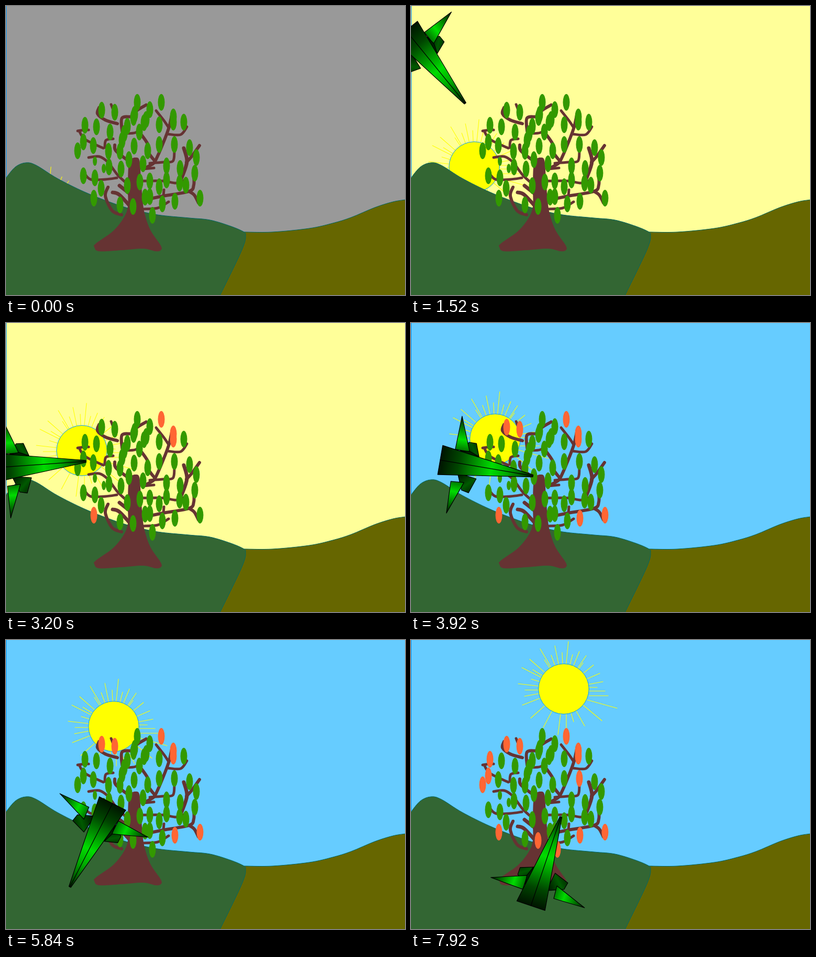
Animation, 763 px wide and 555 px high, one loop 8000 ms. Source, as an HTML page with a canvas:

```html
<!DOCTYPE html>
<html lang="en">
<head>
<meta charset="utf-8">
<title>Tree at sunrise</title>
<style>
  html, body { margin: 0; width: 100%; height: 100%; overflow: hidden; }
  canvas { display: block; width: 763px; height: 555px; }
</style>
</head>
<body>
<canvas id="stage" width="763" height="555"></canvas>
<script>
const c = document.getElementById('stage').getContext('2d');
const LOOP = 8000, STEP = 80;
const BARK = '#663333', TEAL = '#006666', BLUE = '#0099ff';

// Turns "x,y x,y" into a list of number lists.
const parse = s => s.trim().split(/\s+/).map(p => p.split(',').map(Number));

// Catmull-Rom curve through the points.
function spline(p) {
  const path = new Path2D(), n = p.length - 1;
  path.moveTo(...p[0]);
  for (let i = 0; i < n; i++) {
    const a = p[Math.max(i - 1, 0)], b = p[i], d = p[i + 1], e = p[Math.min(i + 2, n)];
    path.bezierCurveTo(
      b[0] + (d[0] - a[0]) / 6, b[1] + (d[1] - a[1]) / 6,
      d[0] - (e[0] - b[0]) / 6, d[1] - (e[1] - b[1]) / 6, d[0], d[1]);
  }
  return path;
}

const curve = s => spline(parse(s));

function polygon(s) {
  const path = new Path2D();
  parse(s).forEach(p => path.lineTo(...p));
  path.closePath();
  return path;
}

// Linear interpolation of rows [time, ...values].
function tween(keys, t) {
  let i = 0;
  while (i < keys.length - 2 && t >= keys[i + 1][0]) i++;
  const a = keys[i], b = keys[i + 1], k = (t - a[0]) / (b[0] - a[0]);
  return a.slice(1).map((v, j) => v + (b[j + 1] - v) * k);
}

const sunKeys = parse(`0,77,400 1520,121,309 3200,145,245 4800,180,196
  5840,206,166 6960,248,129 7920,292,94`);
const planeKeys = parse(`0,-75,-30,55 1520,47,117,51 1760,50,146,46 3200,63,272,-4
  4560,217,284,22 4800,206,302,81 5840,163,394,117 6160,152,417,100
  6560,138,452,45 6960,176,460,-19 7920,258,425,-71.4`);

function skyColor(t) {
  return t < 480 ? '#999999' : t < 1280 ? '#cccc99' : t < 3360 ? '#ffff99' : '#66ccff';
}

const rays = parse(`9,-91 -17,-83 -45,-77 -65,-57 -80,-41 -87,-10 -75,14 -79,31
  -63,56 -39,74 -11,88 19,63 40,71 73,61 30,-72 43,-64 57,-46 69,-30 75,-14
  -3,-70 17,-66 -24,-65 -37,-56 -59,-37 -62,-19 37,-50`);
const flatRays = parse('48,-3,64,-3 48,4,79,4 48,13,85,13 45,21,102,37 -48,2,-74,2 5,48,5,76');

function drawSun(t) {
  c.save();
  c.translate(...tween(sunKeys, t));
  c.beginPath();
  for (const [x, y] of rays) {
    const k = 48 / Math.hypot(x, y);
    c.moveTo(x * k, y * k);
    c.lineTo(x, y);
  }
  for (const [a, b, x, y] of flatRays) {
    c.moveTo(a, b);
    c.lineTo(x, y);
  }
  c.lineWidth = 1.1;
  c.strokeStyle = c.fillStyle = '#ffff00';
  c.stroke();
  c.beginPath();
  c.arc(0, 0, 48.3, 0, 7);
  c.fill();
  c.strokeStyle = BLUE;
  c.lineWidth = 1;
  c.stroke();
  c.restore();
}

const hillEdge = curve(`0,330 18,309 38,301 58,306 98,331 150,357 200,377 240,390
  290,401 350,407 390,411 430,423 455,434 458,441 456,455 444,484 409,556`);
const hill = new Path2D(hillEdge);
hill.lineTo(0, 556);
const fieldEdge = curve('455,434 510,434 580,427 625,417 660,406 705,387 740,376 764,372');
const field = new Path2D(fieldEdge);
field.lineTo(764, 556);
field.lineTo(400, 556);

function drawLand() {
  c.lineWidth = 1;
  c.strokeStyle = TEAL;
  c.fillStyle = '#666600';
  c.fill(field);
  c.stroke(fieldEdge);
  c.fillStyle = '#336633';
  c.fill(hill);
  c.stroke(hillEdge);
}

const trunk = curve(`238,294 234,310 233,350 233,385 225,407 205,432 172,456 169,463
  178,471 220,469 262,466 286,471 296,469 296,460 276,430 265,398 261,370 258,330
  255,296 247,291 238,294`);
// Line width, then the branches of that width.
const branches = [
  [5, ['201,189 205,200 208,214', '158,291 178,289 195,300 214,325 236,345',
    '137,240 150,238 158,238', '140,240 151,256 186,273', '205,255 191,258 189,272',
    '151,323 162,333 190,333 212,330', '275,302 300,300 319,298 322,280',
    '262,313 283,311', '346,232 334,247 310,246', '287,201 302,220 310,232',
    '228,245 248,243 260,232', '262,336 300,336 325,340 340,335',
    '262,390 290,388 311,376', '301,365 302,353']],
  [6, ['178,195 175,207 190,219 213,226', '268,190 250,201 243,212 222,215 222,240',
    '318,204 312,232 303,257 290,288 282,302 266,311',
    '255,242 271,265 273,282 284,297', '208,267 210,278 232,296',
    '262,373 300,365 350,356 359,344 359,325', '350,356 360,363 368,378',
    '370,268 355,289 345,300', '195,348 190,365 203,393 221,401']],
  [7, ['340,273 346,299 336,330', '204,358 216,362 236,383', '217,345 236,360']]
].map(([w, list]) => [w, list.map(curve)]);

const leaves = parse(`251,185 275,199 246,208 244,214 340,223 293,228 173,232 199,242
  232,231 226,245 268,218 264,224 255,242 167,268 196,279 218,279 222,258 245,269
  271,278 293,266 351,272 364,291 361,321 307,307 333,312 235,295 262,303 220,313
  197,309 148,326 170,330 182,350 218,382 232,345 256,338 275,336 293,347 307,334
  332,340 344,344 266,367 275,366 299,380`);
// Leaves that turn orange, by the time of turning.
const ripening = [
  [2240, parse('297,185 320,213 320,223 168,369')],
  [3840, parse('183,200 208,204 323,375 371,369')],
  [6400, parse('151,229 148,261 137,278 322,266 243,385 280,402')]
];

function drawLeaves(list, color, rx = 6.5, ry = 16) {
  c.fillStyle = color;
  for (const [x, y] of list) {
    c.beginPath();
    c.ellipse(x, y, rx, ry, 0, 0, 7);
    c.fill();
  }
}

function drawTree(t) {
  c.fillStyle = c.strokeStyle = BARK;
  c.lineCap = 'round';
  c.fill(trunk);
  for (const [w, list] of branches) {
    c.lineWidth = w;
    list.forEach(b => c.stroke(b));
  }
  drawLeaves(leaves, '#339900');
  drawLeaves([[170, 298], [187, 312]], '#339900', 4, 9);
  for (const [at, list] of ripening) drawLeaves(list, t < at ? '#339900' : '#ff6633');
}

function shade(x0, y0, x1, y1, ...stops) {
  const g = c.createLinearGradient(x0, y0, x1, y1);
  stops.forEach(([at, color]) => g.addColorStop(at, color));
  return g;
}

const DARK = '#001400', MID = '#005a00', BRIGHT = '#00dc00';
const wingStops = [[0, '#006400'], [0.35, BRIGHT], [1, DARK]];
const podStops = [[0, DARK], [0.6, MID], [1, '#002800']];

// The plane points along +x; its parts run from back to front.
const planeParts = [
  [polygon('-16,24 -26,53 -40,50 -53,19'), shade(-50, 20, -20, 50, ...podStops)],
  [polygon('-18,-19 -27,-43 -41,-43 -58,-19'), shade(-50, -20, -20, -42, ...podStops)],
  [polygon('-61,98.5 -63,37 -38,35'), shade(0, 32, 0, 98, ...wingStops)],
  [polygon('-63,-90 -65,-25 -37,-25'), shade(0, -22, 0, -90, ...wingStops)],
  [polygon('-58,-22 -37,-26 -18,-19 -50,-17'), '#002300'],
  [polygon('-90,-28.4 90,-2 90,2 -90,28.4'),
    shade(-90, 0, 90, 0, [0, DARK], [0.2, '#004600'], [0.55, BRIGHT], [0.72, '#00aa00'], [1, '#001e00'])],
  [polygon('-90,0 90,0'), 'transparent']
];

function drawPlane(t) {
  const [x, y, angle] = tween(planeKeys, t);
  c.save();
  c.translate(x, y);
  c.rotate(angle * Math.PI / 180);
  c.lineWidth = 1.2;
  c.lineJoin = 'round';
  c.strokeStyle = '#000';
  for (const [path, fill] of planeParts) {
    c.fillStyle = fill;
    c.fill(path);
    c.stroke(path);
  }
  c.restore();
}

function draw(now) {
  const t = Math.floor(now % LOOP / STEP) * STEP;
  c.fillStyle = skyColor(t);
  c.fillRect(0, 0, 763, 555);
  c.fillStyle = BLUE;
  c.fillRect(0, 0, 1, 328);
  drawSun(t);
  drawLand();
  drawTree(t);
  drawPlane(t);
}

let start;
function tick(now) {
  start ??= now;
  draw(now - start);
  requestAnimationFrame(tick);
}
draw(0);
requestAnimationFrame(tick);
</script>
</body>
</html>
```
